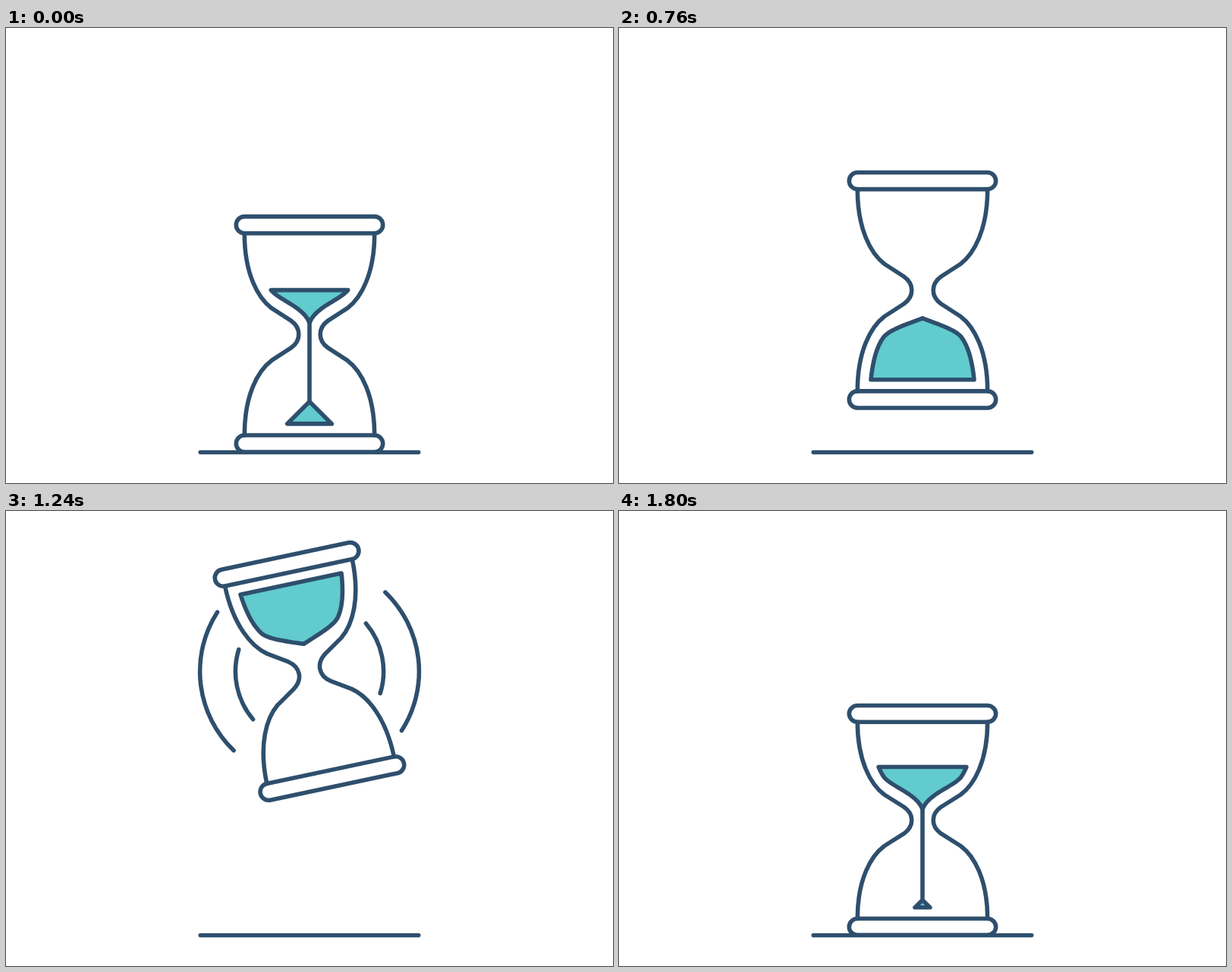
Animation, 800 px wide and 600 px high, one loop 1.84 s. Source, as an HTML page:

```html
<!DOCTYPE html>
<html lang="en">
<head>
<meta charset="utf-8">
<title>Hourglass</title>
<style>
  html, body { margin: 0; width: 100%; height: 100%; overflow: hidden; background: #fff; }
  svg { display: block; width: 800px; height: 600px; }
  .line { fill: none; stroke: #2e4f6d; stroke-width: 5.6; stroke-linecap: round; stroke-linejoin: round; }
  .sand { fill: #62cbcd; }
</style>
</head>
<body>
<svg viewBox="0 0 800 600">
  <path class="line" d="M256.3 559.5H543.7"/>
  <path class="line" id="swooshes" transform="translate(400 211.5)"/>
  <g id="hourglass">
    <path class="line" id="glass"/>
    <rect class="line" x="-96.7" y="-155.3" width="193.4" height="22.2" rx="11.1"/>
    <rect class="line" x="-96.7" y="133.1" width="193.4" height="22.2" rx="11.1"/>
    <path class="line" id="stream"/>
    <path class="line sand" id="upper"/>
    <path class="line sand" id="lower"/>
  </g>
</svg>
<script>
const LOOP = 1840, STEP = 40;
const FLOOR = 559.2, HALF = 155.3, REST = FLOOR - HALF, JUMP = 192.4;
const TURN_START = 1083, TURN_END = 1275;
const DRAIN_START = 1684, DRAIN_END = 2058, PILE_START = 1782, PILE_END = 2200;
const BASE = 118, APEX = 37, NECK = 15;

const $ = id => document.getElementById(id);
const lerp = (a, b, k) => a + (b - a) * k;
const span = (t, a, b) => Math.min(1, Math.max(0, (t - a) / (b - a)));
const sineOut = x => Math.sin(x * Math.PI / 2);
const sineIn = x => 1 - Math.cos(x * Math.PI / 2);
const quadInOut = x => x < .5 ? 2 * x * x : 1 - 2 * (1 - x) ** 2;
const bump = x => Math.sin(x * Math.PI);
const fix = n => n.toFixed(2);

// One side of a full sand heap: a quadratic, then a cubic up to the apex.
const HEAP = [[68, 118], [64, 78], [50.5, 61], [42, 52], [24, 46], [0, APEX]];
// The funnel that the upper sand rests in once it runs.
const FUNNEL = [[68, 118], [64, 78], [50.5, 58], [38, 44], [8, 36], [0, NECK]];

function sidePoint(p, s) {
  const mix = i => {
    if (s < 1) return (1 - s) ** 2 * p[0][i] + 2 * s * (1 - s) * p[1][i] + s * s * p[2][i];
    const k = s - 1, m = 1 - k;
    return m ** 3 * p[2][i] + 3 * m * m * k * p[3][i] + 3 * m * k * k * p[4][i] + k ** 3 * p[5][i];
  };
  return [mix(0), mix(1)];
}

function symmetric(side) {
  const left = side.map(([x, y]) => [-x, y]).reverse();
  return 'M' + [...side, ...left].map(p => p.map(fix).join(' ')).join('L') + 'Z';
}

function sampleSide(points) {
  return Array.from({ length: 41 }, (_, i) => sidePoint(points, i / 20));
}

function upperSand(u) {
  if (u >= DRAIN_END) return '';
  const settle = span(u, DRAIN_START, DRAIN_START + 60);
  const shape = HEAP.map((p, i) => p.map((v, j) => lerp(v, FUNNEL[i][j], settle)));
  const level = lerp(BASE, 20, sineOut(span(u, DRAIN_START, DRAIN_END)));
  const points = sampleSide(shape);
  const first = points.findIndex(p => p[1] <= level + 1e-6);
  const side = points.slice(first);
  if (first > 0) {
    const [a, b] = [points[first - 1], points[first]];
    side.unshift([lerp(a[0], b[0], (a[1] - level) / (a[1] - b[1])), level]);
  }
  return symmetric(side.map(([x, y]) => [x, -y]));
}

// A growing triangle that bulges into the full heap.
function lowerSand(height) {
  if (height <= 0) return '';
  const width = Math.min(68, height), bulge = span(height, 55, BASE - APEX);
  const shape = HEAP.map(([x, y]) =>
    [x * width / 68, lerp(BASE - height * (1 - x / 68), y, bulge)]);
  return symmetric(sampleSide(shape));
}

function arc(r, from, to) {
  const at = deg => [Math.cos(deg * Math.PI / 180), Math.sin(deg * Math.PI / 180)];
  return [1, -1].map(s => {
    const [a, b] = [at(from), at(to)].map(p => p.map(v => fix(v * r * s)).join(' '));
    return `M${a}A${r} ${r} 0 0 1 ${b}`;
  }).join('');
}

function swooshes(t) {
  const head = sineOut(span(t, 1120, 1280)), tail = span(t, 1160, 1312) ** 2;
  if (head <= 0 || tail >= 1) return '';
  return arc(144.4, lerp(-80, 42, tail), lerp(-80, 42, head)) +
         arc(97.6, lerp(-65, 24, tail), lerp(-65, 24, head));
}

function draw(t) {
  const rise = sineOut(span(t, 681, 1085)) - sineIn(span(t, 1271, 1659));
  const squash = 1 - .04 * (bump(span(t, 560, 681)) + bump(span(t, 1659, LOOP)));
  const angle = t < TURN_END ? 180 * quadInOut(span(t, TURN_START, TURN_END)) : 0;
  const y = REST - JUMP * rise + HALF * (1 - squash);
  $('hourglass').setAttribute('transform',
    `translate(400 ${fix(y)}) scale(1 ${squash.toFixed(4)}) rotate(${fix(angle)})`);
  $('swooshes').setAttribute('d', swooshes(t));

  // Sand time runs on from the turn, across the loop point.
  const u = t < TURN_END ? t + LOOP : t;
  const height = (BASE - APEX) * (1 - (1 - span(u, PILE_START, PILE_END)) ** 3);
  const top = BASE - height;
  const streamEnd = Math.min(top, lerp(-NECK, BASE, span(u, 1690, PILE_START) ** 2));
  const streamStart = lerp(-NECK, top, span(u, DRAIN_END, 2100));
  $('upper').setAttribute('d', upperSand(u));
  $('lower').setAttribute('d', lowerSand(height));
  $('stream').setAttribute('d',
    u > 1690 && u < 2100 ? `M0 ${fix(streamStart)}V${fix(streamEnd)}` : '');
}

$('glass').setAttribute('d', [1, -1].map(s =>
  `M${85.7 * s} -133C${85.7 * s} -80 ${68 * s} -48 ${50 * s} -34.5L${24.5 * s} -18` +
  `C${17.5 * s} -13 ${14.2 * s} -7 ${14.2 * s} 0S${17.5 * s} 13 ${24.5 * s} 18` +
  `L${50 * s} 34.5C${68 * s} 48 ${85.7 * s} 80 ${85.7 * s} 133`).join(''));

const start = performance.now();
function tick() {
  const t = (performance.now() - start) % LOOP;
  draw(Math.floor(t / STEP) * STEP);
  requestAnimationFrame(tick);
}
tick();
</script>
</body>
</html>
```
